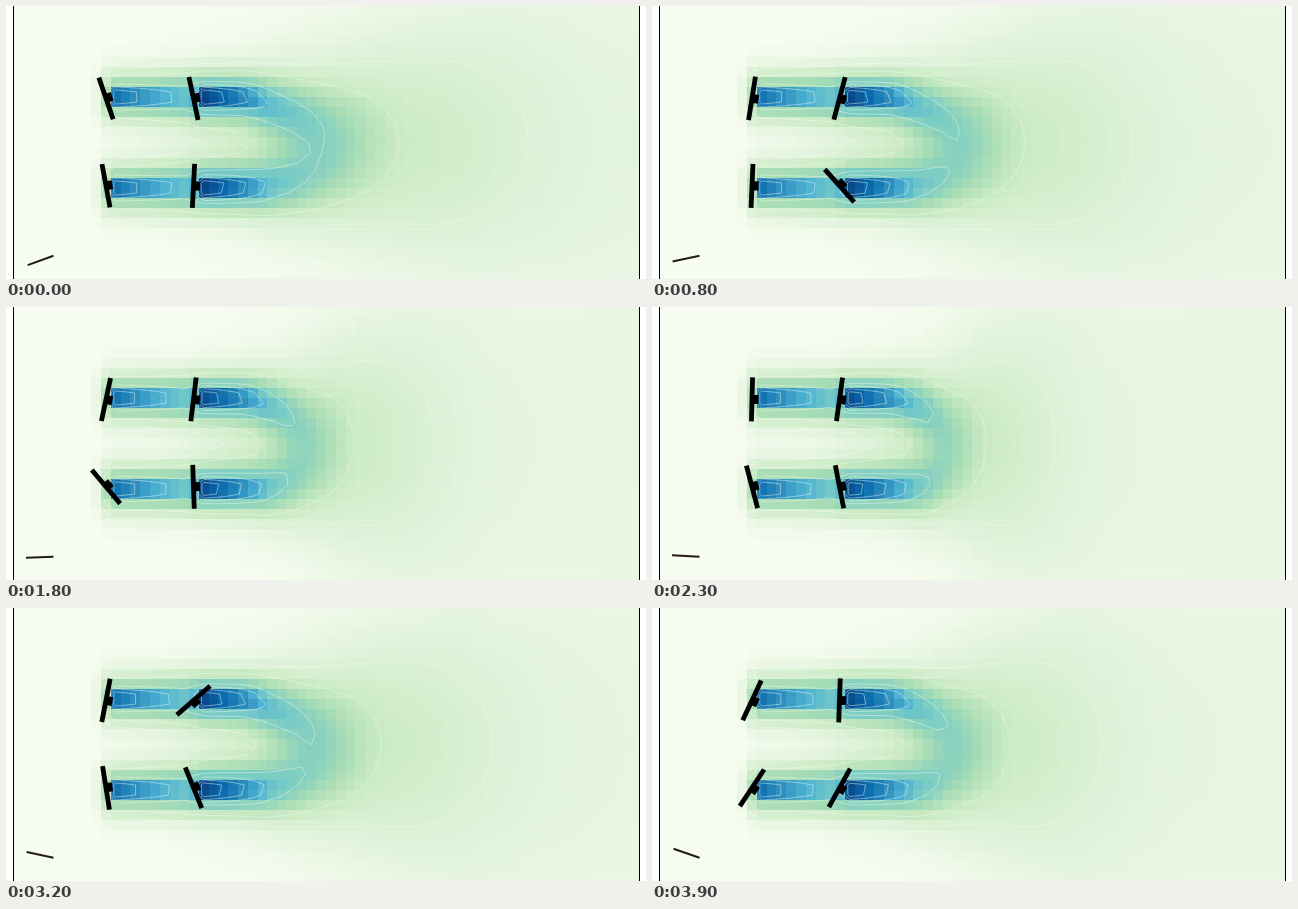
Write an HTML page with a canvas that moves like this. It is 640 px wide and 273 px high and loops after 4 s.

```html
<!DOCTYPE html>
<html lang="en">
<head>
<meta charset="utf-8">
<title>Wind farm wakes</title>
<style>
html, body { margin: 0; width: 100%; height: 100%; overflow: hidden; background: #fff; }
canvas { display: block; }
</style>
</head>
<body>
<canvas id="stage" width="640" height="273"></canvas>
<script>
const ctx = document.getElementById('stage').getContext('2d');
const STEP = 100, STEPS = 40;
const COLS = 64, ROWS = 27, LEFT = 7, CW = 626 / COLS, CH = 273 / ROWS;
const MID = 136, UPPER = 91, LOWER = 182;

const PALETTE = [
  [247, 252, 240], [224, 243, 219], [204, 235, 197], [168, 221, 181], [123, 204, 196],
  [78, 179, 211], [43, 140, 190], [8, 104, 172], [8, 64, 129]
];
const LEVELS = [.155, .26, .47, .6, .74, .88];

// Yaw poses in degrees at the shared key steps
const KEYS = [0, 8, 12, 18, 28, 32, 39];
const TURBINES = [
  { x: 100, y: 92.4, yaw: [-19, 9, 5, 12, -9, 11, 25] },
  { x: 187.5, y: 92.4, yaw: [-12, 15, -7, 7, 9, 49, 2] },
  { x: 100, y: 179.8, yaw: [-10.5, 2.5, -9, -40, 10.5, -9, 33.5] },
  { x: 187.5, y: 179.8, yaw: [3, -42, 10, -2, -20, -22, 29] }
];

const clamp = (v, lo, hi) => Math.min(hi, Math.max(lo, v));
const mix = (a, b, u) => a + (b - a) * u;
const bell = (d, s) => Math.exp(-d * d / (2 * s * s));
const smooth = (a, b, x) => {
  const u = clamp((x - a) / (b - a), 0, 1);
  return u * u * (3 - 2 * u);
};

const colX = c => LEFT + c * CW;
const midX = c => colX(c + .5);
const midY = r => (r + .5) * CH;

// The merged wake shrinks steadily, then springs back
const wakeLength = i => (126 - 2.6 * (i % 25)) / 102;

// Wind speed loss for one column, as a function of y
function column(px, len) {
  const x = px < 270 ? px : 270 + (px - 270) / len;
  const rise = smooth(110, 330, px + 50 * (len - 1));
  const halo = rise * (.085 + .18 * bell(Math.max(0, x - 330), 105));
  const haloW = 55 + .00095 * Math.max(0, x - 200) ** 2;
  const twin = (.52 * smooth(84, 108, x) + .07 * smooth(180, 195, x)) * (1 - smooth(190, 380, x));
  const twinW = 18 + 12 * smooth(220, 360, x);
  const rotor = x < 190 ? 105 : 193;
  const core = x < 105 ? 0 : .38 * Math.max(0, 1 - (x - rotor) / 72) * (x > 183 && x < 193 ? .2 : 1);
  const centres = [
    UPPER + 25 * smooth(230, 330, x),
    LOWER - 18 * smooth(250, 350, x)
  ];
  return y => centres.reduce(
    (sum, c) => sum + twin * bell(y - c, twinW) + core * Math.exp(-(((y - c) / 10) ** 4)),
    halo * bell(y - MID, haloW)
  );
}

function sampleField(len) {
  return Array.from({ length: COLS }, (_, c) => {
    const loss = column(midX(c), len);
    return Array.from({ length: ROWS }, (_, r) => loss(midY(r)));
  });
}

function colour(v) {
  const s = clamp(v, 0, .999) * 8, k = Math.floor(s);
  return `rgb(${PALETTE[k].map((a, n) => Math.round(mix(a, PALETTE[k + 1][n], s - k)))})`;
}

function drawCells(field) {
  field.forEach((cells, c) => {
    const x = Math.round(colX(c)), w = Math.round(colX(c + 1)) - x;
    cells.forEach((v, r) => {
      const y = Math.round(r * CH), h = Math.round((r + 1) * CH) - y;
      ctx.fillStyle = colour(v);
      ctx.fillRect(x, y, w, h);
    });
  });
}

// Marching squares between cell centres
function traceLevel(field, level) {
  for (let c = 0; c < COLS - 1; c++) {
    for (let r = 0; r < ROWS - 1; r++) {
      const corners = [[c, r], [c + 1, r], [c + 1, r + 1], [c, r + 1]];
      const hits = [];
      corners.forEach(([ac, ar], k) => {
        const [bc, br] = corners[(k + 1) % 4];
        const a = field[ac][ar], b = field[bc][br];
        if (a < level === b < level) return;
        const u = (level - a) / (b - a);
        hits.push([midX(mix(ac, bc, u)), midY(mix(ar, br, u))]);
      });
      for (let k = 0; k < hits.length; k += 2) {
        ctx.moveTo(...hits[k]);
        ctx.lineTo(...hits[k + 1]);
      }
    }
  }
}

function drawContours(field) {
  ctx.strokeStyle = 'rgba(240,250,238,.5)';
  ctx.lineWidth = .9;
  ctx.beginPath();
  LEVELS.forEach(level => traceLevel(field, level));
  ctx.stroke();
}

function yawAt(yaw, i) {
  const k = Math.max(1, KEYS.findIndex(key => i <= key));
  return mix(yaw[k - 1], yaw[k], (i - KEYS[k - 1]) / (KEYS[k] - KEYS[k - 1]));
}

function drawTurbine({ x, y, yaw }, i) {
  ctx.save();
  ctx.translate(x, y);
  ctx.rotate(yawAt(yaw, i) * Math.PI / 180);
  ctx.fillStyle = '#000';
  ctx.fillRect(-2.4, -22, 4.8, 44);
  ctx.fillRect(0, -4.5, 6.5, 9);
  ctx.restore();
}

// The wind vane turns one degree per step
function drawWind(i) {
  const a = (20 - i) * Math.PI / 180;
  ctx.strokeStyle = '#221a1a';
  ctx.lineWidth = 2;
  ctx.beginPath();
  ctx.moveTo(47.5, 249.7);
  ctx.lineTo(47.5 - 27.5 * Math.cos(a), 249.7 + 27.5 * Math.sin(a));
  ctx.stroke();
}

function draw(i) {
  const field = sampleField(wakeLength(i));
  ctx.fillStyle = '#fff';
  ctx.fillRect(0, 0, 640, 273);
  drawCells(field);
  drawContours(field);
  TURBINES.forEach(t => drawTurbine(t, i));
  drawWind(i);
  ctx.fillStyle = '#000';
  for (const x of [7, 633]) ctx.fillRect(x, 0, 1, 273);
}

let shown = -1;
function tick() {
  const i = Math.floor(performance.now() / STEP) % STEPS;
  if (i !== shown) draw(shown = i);
  requestAnimationFrame(tick);
}
tick();
</script>
</body>
</html>
```
